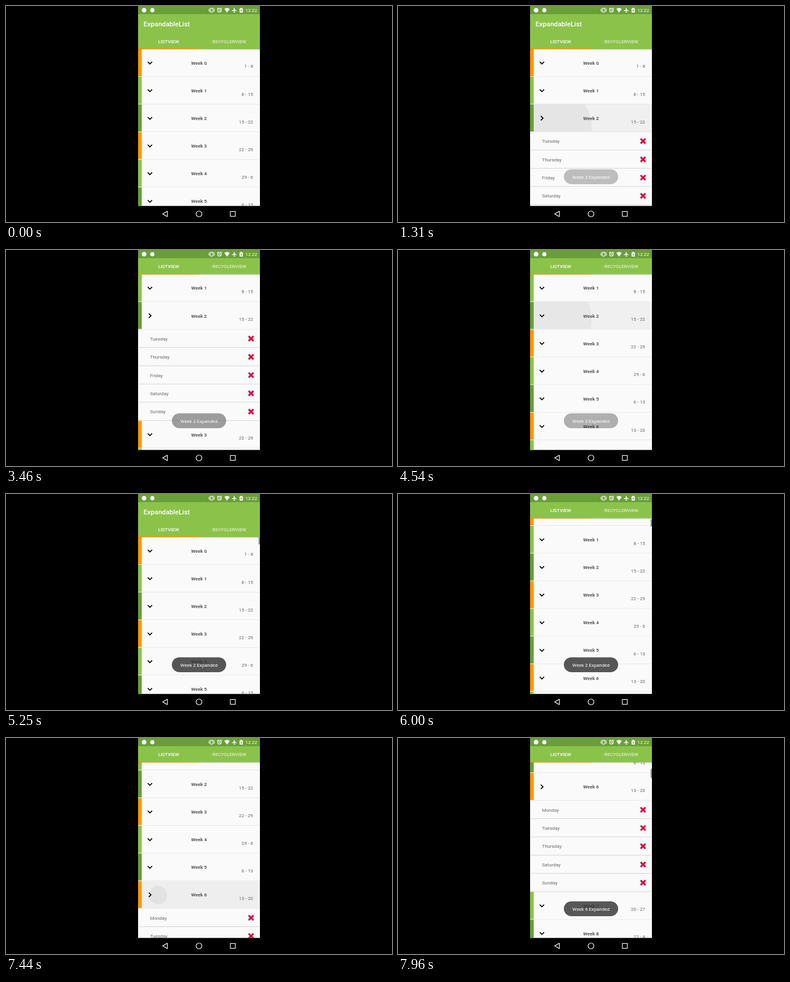
Write an HTML page that moves like this. It is 640 by 360 pixels and loops after 7990 ms.

```html
<!DOCTYPE html>
<html lang="en">
<head>
<meta charset="utf-8">
<title>ExpandableList</title>
<style>
html, body { margin: 0; width: 100%; height: 100%; overflow: hidden; background: #000; }
svg { display: block; width: 100vw; height: 100vh; }
text { font: 7.86px Roboto, sans-serif; }
.mid { text-anchor: middle; }
.bold { font-weight: 700; fill: #565656; }
.range { text-anchor: end; fill: #686868; }
.day { fill: #686868; }
.tab { font-weight: 500; text-anchor: middle; fill: #fff; }
.title { font-size: 11.22px; font-weight: 500; fill: #fff; }
.line { fill: none; stroke: #fff; stroke-width: 1.1; }
</style>
</head>
<body>
<svg id="stage" viewBox="0 0 640 360">
  <defs>
    <clipPath id="phone"><rect x="219" y="0" width="202" height="333.2"/></clipPath>
    <clipPath id="rowBox"><rect x="219" y="0" width="202" height="45.4"/></clipPath>
  </defs>
  <rect width="640" height="360"/>
  <g clip-path="url(#phone)">
    <rect x="219" width="202" height="334" fill="#fafafa"/>
    <g id="list"></g>
    <rect id="thumb" x="418.8" width="2.2" fill="#8f8f8f"/>
    <g id="bar">
      <rect x="219" y="13" width="202" height="58.9" fill="#8bc34a"/>
      <rect x="219" y="71.8" width="202" height="1" opacity=".15"/>
      <rect x="219" y="70.6" width="101" height="1.4" fill="#ff9800"/>
      <text class="title" x="228" y="34">ExpandableList</text>
      <text class="tab" x="269.5" y="61.7">LISTVIEW</text>
      <text class="tab" x="370.3" y="61.7" opacity=".7">RECYCLERVIEW</text>
    </g>
    <rect x="219" width="202" height="13.6" fill="#689f38"/>
    <g fill="#fff">
      <circle cx="229" cy="7" r="3.8"/>
      <circle cx="242.6" cy="7" r="3.5"/>
      <rect class="line" x="338.8" y="3.9" width="4.4" height="6.4" rx=".6"/>
      <path class="line" d="M336.8 4.6v5M345.2 4.6v5"/>
      <circle class="line" cx="354" cy="7.3" r="3"/>
      <path class="line" d="M354 5.5v2l1.3 1M350.2 4.6l2-1.7M357.8 4.6l-2-1.7"/>
      <path d="M362 5Q366.5 1.5 371 5L366.5 11Z"/>
      <path d="M378.5 3c.5 0 .7.4.7.9v1.9l3.2 2v.9l-3.2-1v2l.9.7v.7l-1.6-.5-1.6.5v-.7l.9-.7v-2l-3.2 1v-.9l3.2-2V3.9c0-.5.2-.9.7-.9Z"/>
      <path d="M387.3 3.9h1.5V3h2.4v.9h1.5V11h-5.4Z"/>
      <path fill="#689f38" d="M390.6 4.9l-1.8 3h1V10l1.7-3h-1Z"/>
      <text x="396.8" y="9.9" font-weight="500">12:22</text>
    </g>
  </g>
  <g id="toast">
    <rect x="275" y="272.2" width="90" height="24.8" rx="12.4" fill="#323232" fill-opacity=".82"/>
    <text id="note" class="mid" x="320" y="287.6" fill="#fff"></text>
  </g>
  <g class="line">
    <path d="M267.5 342v9l-7.8-4.5Z" stroke-linejoin="round"/>
    <circle cx="320" cy="346.5" r="4.8"/>
    <rect x="372" y="342.5" width="8.2" height="8"/>
  </g>
</svg>
<script>
const LOOP = 7990, TOP = 71.8, ROW = 46.1, CHILD = 30.4, BAR = 31.4;
const COLORS = ['#ff9800', '#8bc34a', '#689f38'];
const RANGES = ['1 - 8', '8 - 15', '15 - 22', '22 - 29', '29 - 6', '6 - 13',
  '13 - 20', '20 - 27', '27 - 4', '4 - 11'];
const DAYS = {
  2: ['Tuesday', 'Thursday', 'Friday', 'Saturday', 'Sunday'],
  6: ['Monday', 'Tuesday', 'Thursday', 'Saturday', 'Sunday']
};
// x, y: touch point inside the row; end: when its toast starts to fade
const TAPS = [
  { t: 1010, row: 2, x: 256, y: 38, end: 3130 },
  { t: 4210, row: 2, x: 247, y: 30, end: 6330 },
  { t: 7310, row: 6, x: 252, y: 23.5, end: 9230 }
];
// start, stop, from, to, ease-out power, scrollbar fade start
const SCROLLS = [
  [1830, 2250, 0, 77.5, 2.7, 2640],
  [4590, 4990, 77.5, 0, 2, 5250],
  [5870, 6380, 0, 110, 3, 6750],
  [7600, 7990, 110, 291, 2, 8380]
];

const $ = id => document.getElementById(id);
const clamp = v => Math.max(0, Math.min(1, v));
const easeOut = (x, p) => 1 - Math.pow(1 - clamp(x), p);

function add(parent, tag, attrs, text) {
  const el = document.createElementNS('http://www.w3.org/2000/svg', tag);
  for (const k in attrs) el.setAttribute(k, attrs[k]);
  if (text) el.textContent = text;
  parent.appendChild(el);
  return el;
}
const moveY = (el, y) => el.setAttribute('transform', `translate(0 ${y.toFixed(2)})`);
const divider = (g, y, fill) => add(g, 'rect', { x: 219, y, width: 202, height: 0.9, fill });

function makeRow(range, i) {
  const g = add($('list'), 'g', {});
  const glow = add(g, 'g', { 'clip-path': 'url(#rowBox)', opacity: 0 });
  add(glow, 'rect', { x: 219, y: 0, width: 202, height: 46, fill: '#eeeeee' });
  const spot = add(glow, 'circle', { fill: '#e2e2e2' });
  add(g, 'rect', { x: 219, y: 0, width: 6, height: 45.2, fill: COLORS[i % 3] });
  divider(g, 45.2, '#e6e6e6');
  const arrow = add(g, 'path', {
    d: 'M-3.6 -1.8L0 1.8L3.6 -1.8', fill: 'none', stroke: '#000', 'stroke-width': 1.6
  });
  add(g, 'text', { class: 'mid bold', x: 320, y: 26 }, 'Week ' + i);
  add(g, 'text', { class: 'range', x: 409.8, y: 31.7 }, range);
  const kids = add(g, 'g', {});
  (DAYS[i] || []).forEach((day, n) => {
    const y = ROW + n * CHILD, top = y + 11.1;
    add(kids, 'text', { class: 'day', x: 238.7, y: y + 18.1 }, day);
    add(kids, 'path', {
      d: `M402.3 ${top}l8 8m0 -8l-8 8`, stroke: '#d61040', 'stroke-width': 3.1
    });
    divider(kids, y + CHILD - 0.9, '#d4d4d4');
  });
  return { g, glow, spot, arrow, kids };
}
const rows = RANGES.map(makeRow);

function scrollAt(t) {
  let pos = 0;
  for (const [a, b, from, to, p] of SCROLLS)
    if (t >= a) pos = from + (to - from) * easeOut((t - a) / (b - a), p);
  return pos;
}

function openRow(t) {
  if (t >= 1110 && t < 4310) return 2;
  return t >= 7410 ? 6 : -1;
}

function drawRows(open) {
  let y = TOP;
  rows.forEach((r, i) => {
    const on = i === open;
    moveY(r.g, y);
    r.arrow.setAttribute('transform', `translate(238.6 23) rotate(${on ? -90 : 0})`);
    r.kids.setAttribute('display', on ? 'inline' : 'none');
    r.glow.setAttribute('opacity', 0);
    y += ROW + (on ? DAYS[i].length * CHILD : 0);
  });
}

function drawTaps(t) {
  let alpha = 0;
  for (const tap of TAPS) {
    const dt = t - tap.t;
    if (dt < 0) continue;
    const { glow, spot } = rows[tap.row];
    glow.setAttribute('opacity', clamp(dt / 60) * clamp((650 - dt) / 400));
    spot.setAttribute('cx', tap.x);
    spot.setAttribute('cy', tap.y);
    spot.setAttribute('r', Math.max(0, (dt - 79) * 0.294));
    const out = clamp((t - tap.end) / 500);
    alpha = easeOut((dt - 200) / 500, 2) * (1 - out * out);
    $('note').textContent = `Week ${tap.row} Expanded`;
  }
  $('toast').setAttribute('opacity', alpha);
}

function drawThumb(t, pos, shift, open) {
  let alpha = 0;
  for (const s of SCROLLS)
    if (t >= s[0]) alpha = 1 - clamp((t - s[5]) / 300);
  const thumb = $('thumb');
  thumb.setAttribute('y', TOP + 0.4 - shift + (pos - shift) * 0.041);
  thumb.setAttribute('height', open < 0 ? 12 : 15);
  thumb.setAttribute('opacity', alpha);
}

function draw(t) {
  const pos = scrollAt(t), shift = Math.min(pos, BAR), open = openRow(t);
  moveY($('list'), -pos);
  moveY($('bar'), -shift);
  drawRows(open);
  drawTaps(t);
  drawThumb(t, pos, shift, open);
}

function tick() {
  draw(performance.now() % LOOP);
  requestAnimationFrame(tick);
}
tick();
</script>
</body>
</html>
```
